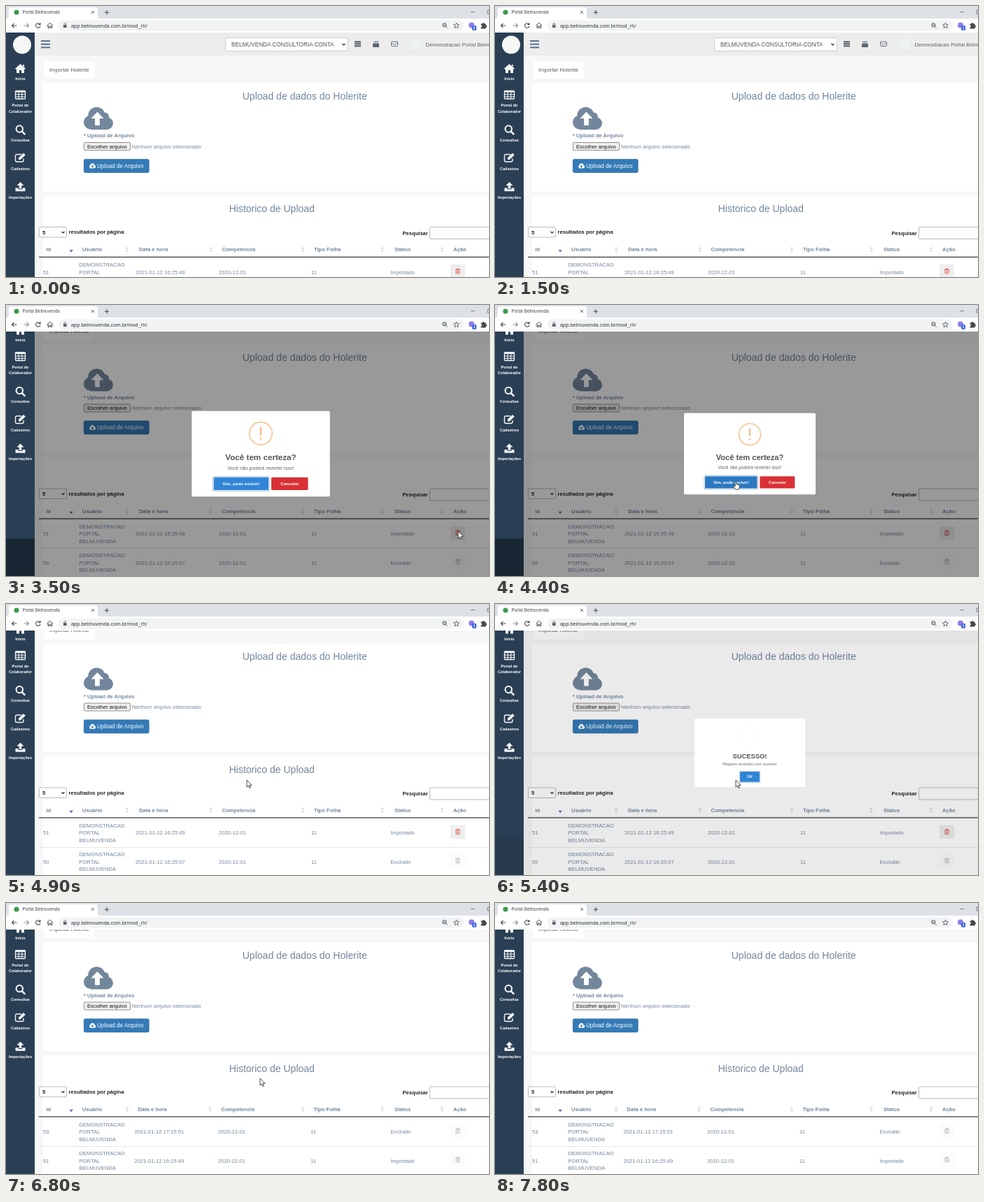
Animation of 690x388 px, one loop 7900 ms. Source, as an HTML page:

```html
<!DOCTYPE html>
<html lang="pt-BR">
<head>
<meta charset="utf-8">
<title>Portal Belmuvenda</title>
<style>
html, body { margin: 0; width: 100%; height: 100%; overflow: hidden; background: #fff; }
svg { display: block; width: 100vw; height: 100vh; }
text { font-family: "Liberation Sans", Arial, sans-serif; white-space: pre; }
</style>
</head>
<body>
<svg id="stage" viewBox="0 0 690 388"></svg>
<script>
const LOOP = 7900, SCROLL = 53.5;
const SLATE = '#73879c', NAVY = '#2a3f54', BLUE = '#3085d6';
const stage = document.getElementById('stage');

// Markup helpers; text is placed by the middle of its capitals.
const rect = (x, y, w, h, fill, more = '') =>
  `<rect x="${x}" y="${y}" width="${w}" height="${h}" fill="${fill}" ${more}/>`;
const circle = (x, y, r, fill, more = '') =>
  `<circle cx="${x}" cy="${y}" r="${r}" fill="${fill}" ${more}/>`;
const path = (d, fill, more = '') => `<path d="${d}" fill="${fill}" ${more}/>`;
const line = (d, color, w = 1, more = '') =>
  path(d, 'none', `stroke="${color}" stroke-width="${w}" ${more}`);
const text = (x, y, s, size, fill, more = '') =>
  `<text x="${x}" y="${y + size * 0.35}" font-size="${size}" fill="${fill}" ${more}>${s}</text>`;
const group = (id, body) => `<g id="${id}">${body}</g>`;
const BOLD = 'font-weight="700"', MID = 'text-anchor="middle"';
const chevron = (x, y) => line(`M${x - 2} ${y - 1}l2 2l2-2`, '#222', 1.1);

function browser() {
  const I = '#45494d';
  return rect(0, 0, 690, 18, '#dee1e6') +
    path('M1 18q3 0 3-3V5q0-3 3-3H128q3 0 3 3v10q0 3 3 3z', '#fff') +
    circle(15, 9, 3.6, '#3c9a4e') +
    text(23.5, 9, 'Portal Belmuvenda', 6.3, I) +
    line('M122 7l4 4m0-4l-4 4', '#5f6368', 0.9) +
    line('M144 6v6.4M140.8 9.2h6.4', I) +
    line('M664 8.5h6M690 6h-2v5h2', '#666', 0.8) +
    rect(0, 18, 690, 20, '#fff') +
    rect(75, 20.5, 579, 15, '#f1f3f4', 'rx="7.5"') +
    line('M15.5 28h-7m3-3l-3 3l3 3', I, 1.1) +
    line('M25.5 28h7m-3-3l3 3l-3 3', '#8d9195', 1.1) +
    line('M48.5 26a3.3 3.3 0 1 0 .5 3M49 24v2.6h-2.6', I, 1.1) +
    line('M58.5 28.2l4.3-4l4.3 4M60 27.5v4h1.8v-2.6h2v2.6h1.8v-4', I) +
    rect(82, 27, 4.6, 4, '#5f6368', 'rx=".6"') +
    line('M83 27.2v-1.4a1.3 1.3 0 0 1 2.6 0v1.4', '#5f6368', 0.8) +
    text(93, 28, 'app.belmuvenda.com.br/mod_rh/', 7.4, '#33373a') +
    circle(626.3, 27.2, 2.6, 'none', `stroke="${I}"`) +
    line('M628.3 29.2l2.3 2.3M625 27.2h2.6', I, 0.9) +
    line('M643.5 24l1.1 2.7l2.9.2l-2.2 1.9l.7 2.8l-2.5-1.5l-2.5 1.5l.7-2.8l-2.2-1.9l2.9-.2z', I, 0.8) +
    circle(665, 27.5, 4, '#8b7fe8') +
    rect(666, 28, 6, 6.8, '#3b62d9', 'rx="1.4"') +
    text(669, 31.5, '2', 5.4, '#fff', `id="badge" ${MID} ${BOLD}`) +
    path('M678.5 25.6h2a1.5 1.5 0 0 1 3 0h2v2a1.5 1.5 0 0 1 0 3v1.9h-7v-2a1.4 1.4 0 0 0 0-2.9z', I);
}

function sidebar() {
  const W = '#f3f6f8';
  const label = (y, s) => text(20.5, y, s, 5.55, '#fff', `${MID} ${BOLD}`);
  return rect(0, 38, 41, 520, NAVY) +
    circle(23, 55.5, 13, '#f4f7f4') +
    path('M20.5 83l7.5 6.6l-1 1.1l-1-.8v6h-4v-4h-3v4h-4v-6l-1 .8l-1-1.1zM24 84h2v3l-2-1.6z', W) +
    label(104, 'Início') +
    rect(13.5, 121.5, 14, 11.5, 'none', `stroke="${W}" stroke-width="1.3" rx="1"`) +
    rect(13.5, 121, 14, 2.6, W) +
    line('M18.2 122v11M22.8 122v11M13.5 126.6h14M13.5 129.9h14', W) +
    label(142.2, 'Portal do') + label(151, 'Colaborador') +
    circle(19.3, 176, 4.7, 'none', `stroke="${W}" stroke-width="2.1"`) +
    line('M22.8 179.6l3.8 3.8', W, 2.6, 'stroke-linecap="round"') +
    label(191.7, 'Consultas') +
    line('M22 212.5h-6.5q-2 0-2 2v6.5q0 2 2 2h7.5q2 0 2-2v-2.5', W, 1.4) +
    path('M18 217.2l7-6.8l2.8 2.8l-7 6.8h-2.8z', W) +
    label(233, 'Cadastros') +
    path('M20.5 252l5 5h-3.2v4.5h-3.6v-4.5h-3.2zM13.5 260.5h4v2h6v-2h4v4.8h-14z', W) +
    label(274, 'Importações');
}

function topbar() {
  const I = '#5b6570';
  return rect(41, 38, 649, 33, '#ededed') +
    [50, 54.6, 59.2].map(y => rect(50, y - 0.9, 13, 2.1, '#5a738e')).join('') +
    rect(313.5, 45.5, 175, 19, '#fff', 'stroke="#ccc" rx="1"') +
    text(322, 55, 'BELMUVENDA CONSULTORIA CONTA', 8.2, '#4d5359') + chevron(482.5, 55) +
    [50.2, 53.2, 56.2].map(y => rect(498, y, 9, 2.2, I)).join('') +
    path('M524 54h9v5h-9z', I) +
    line('M526 50v4M528.5 50v4M531 50v4', I, 1.1) +
    rect(550.5, 51, 9, 6.6, 'none', `stroke="${I}" stroke-width=".9" rx="1"`) +
    line('M550.5 52.5l4.5 3l4.5-3', I, 0.8) +
    circle(585.5, 55, 8, '#eef4ef') +
    text(599.5, 55, 'Demonstracao Portal Belmuvenda', 7.64, '#5a6168');
}

function upload() {
  const cloud = circle(121, 166.5, 10, SLATE) + circle(129.5, 157, 12.2, SLATE) +
    circle(141, 158.5, 6, SLATE) + circle(144, 168, 9, SLATE) + rect(121, 160, 23, 17, SLATE);
  return rect(54, 79, 73, 30, '#fff', 'stroke="#eee" stroke-width=".6"') +
    text(62, 91.3, 'Importar Holerite', 7.64, '#555e68') +
    rect(52, 104, 638, 5, '#f7f7f7') +
    rect(52, 109, 640, 157, '#fff', 'stroke="#f0f0f0" stroke-width=".6"') +
    text(337.7, 128.7, 'Upload de dados do Holerite', 14.05, SLATE) + cloud +
    path('M130.5 151.5l9 9.5h-5.6v10h-6.8v-10h-5.6z', '#fff') +
    text(111, 185.8, '* Upload de Arquivo', 7.6, SLATE, BOLD) +
    rect(111.5, 195.5, 66, 11, '#efefef', 'stroke="#767676" stroke-width=".8" rx="1.5"') +
    text(116, 201, 'Escolher arquivo', 7.64, '#111') +
    text(180, 201, 'Nenhum arquivo selecionado', 7.64, SLATE) +
    rect(111.4, 219.4, 92.8, 19, '#337ab7', 'stroke="#2e6da4" stroke-width=".8" rx="1.8"') +
    circle(121.5, 230, 2.4, '#fff') + circle(123.5, 228, 2.8, '#fff') +
    circle(126, 230, 2.2, '#fff') + rect(121, 229, 5, 3.4, '#fff') +
    path('M123.5 227.8l2 2.2h-1.3v1.8h-1.4v-1.8h-1.3z', '#337ab7') +
    text(130, 229, 'Upload de Arquivo', 8.15, '#fff');
}

function trash(y, live) {
  const c = live ? '#e0504c' : '#b4b7ba';
  return rect(635, y - 10, 21, 19.5, live ? '#eee' : '#fbfbfb', 'rx="1.5"') +
    line(`M642 ${y - 2.5}h7M644.2 ${y - 2.7}v-1.3h2.6v1.3`, c, 0.9) +
    line(`M642.9 ${y - 2}v5h5.2v-5M644.7 ${y - 1}v3M646.3 ${y - 1}v3`, c, 0.8);
}

function table(rows, dx) {
  const heads = [['id', 57.5], ['Usuário', 109], ['Data e hora', 190 + dx * 1.5],
    ['Competencia', 308.5 + dx], ['Tipo Folha', 440 + dx / 2], ['Status', 555], ['Ação', 639]];
  const sorts = [173, 292.5 + dx, 424, 537.5, 623];
  let out = heads.map(([s, x]) => text(x, 348.4, s, 7.6, SLATE, BOLD)).join('') +
    path('M90.5 349.2h5.4l-2.7 3.6z', '#5a6fb5') +
    sorts.map(x => path(`M${x - 2.4} 348h4.8l-2.4-3.4zM${x - 2.4} 349.5h4.8l-2.4 3.4z`, '#dadde0')).join('') +
    rect(47, 358.9, 643, 1.2, '#333');
  rows.forEach(([id, date, status, live], i) => {
    const y = 381.2 + i * 41.3;
    const cells = [[53, id], [185 + dx * 1.5, date], [304 + dx, '2020-12-01'], [436 + dx, '11'], [549.5, status]];
    out += cells.map(([x, s]) => text(x, y, s, 7.64, SLATE)).join('') +
      ['DEMONSTRACAO', 'PORTAL', 'BELMUVENDA'].map((s, k) => text(104.5, y + (k - 1) * 10.8, s, 7.64, SLATE)).join('') +
      rect(47, y + 20.3, 643, 0.7, '#ddd') + trash(y - 1.2, live);
  });
  return out;
}

function history() {
  return rect(52, 271, 640, 300, '#fff', 'stroke="#f0f0f0" stroke-width=".6"') +
    text(318.7, 290.1, 'Historico de Upload', 14, SLATE) +
    rect(47.5, 316.5, 39, 14.5, '#fff', 'stroke="#aaa" stroke-width=".8" rx="1"') +
    text(52, 324, '5', 7.64, '#222', BOLD) + chevron(81.5, 324) +
    text(89.5, 323.5, 'resultados por página', 7.58, '#222', BOLD) +
    text(566.5, 325, 'Pesquisar', 7.6, '#222', BOLD) +
    rect(605.5, 316.5, 95, 17, '#fff', 'stroke="#aaa" stroke-width=".8" rx="1"') +
    group('before', table([[51, '2021-01-12 16:25:49', 'Importado', 1], [50, '2021-01-12 16:25:07', 'Excluido', 0]], 0)) +
    group('after', table([[53, '2021-01-12 17:15:51', 'Excluido', 0], [51, '2021-01-12 16:25:49', 'Importado', 0]], -1));
}

function button(x, w, s, fill, id, focus) {
  const ring = focus ? rect(x - 1.6, 243.6, w + 3.2, 20.6, '#adc1d5', 'rx="2.5"') +
    rect(x - 0.6, 244.6, w + 1.2, 18.6, '#fff', 'rx="2"') : '';
  return ring + rect(x, 245.2, w, 17.4, fill, `rx="1.5" id="${id}"`) +
    text(x + w / 2, 254, s, 5.9, '#fff', `${MID} ${BOLD}`);
}

const modal = (id, title, note, body) => group(id,
  rect(270, 154.7, 188, 116.6, '#fff', 'rx="1.8"') +
  text(364, 218.1, title, 11.1, '#545454', `${MID} ${BOLD}`) +
  text(364, 232.2, note, 6.65, '#666', MID) + body);

const confirmBox = modal('confirm', 'Você tem certeza?', 'Você não poderá reverter isso!',
  circle(364, 185.2, 15.5, 'none', 'stroke="#f8c594" stroke-width="1.6"') +
  rect(363, 176.5, 2, 11.5, '#f6b47b', 'rx="1"') + circle(364, 192.5, 1.3, '#f6b47b') +
  button(300, 74.5, 'Sim, pode excluir!', BLUE, 'yes', true) +
  button(378.3, 50, 'Cancelar', '#d93035', 'no'));

const doneBox = modal('done', 'SUCESSO!', 'Registro excluído com sucesso',
  circle(364, 185, 15.5, 'none', 'id="ring" stroke="#a5dc86" stroke-width="1.8"') +
  line('M355.5 185.5l6 6l11.5-12', '#a5dc86', 2, 'id="check" pathLength="1" stroke-dasharray="1 2" stroke-linecap="round"') +
  button(347.4, 33.2, 'OK', BLUE, 'ok', true));

const arrow = path('M0 0v10.2l2.3-2.2l1.6 3.6l1.5-.7l-1.5-3.5h3.2z', '#fff',
  'id="arrow" stroke="#222" stroke-width=".8"');
const hand = path('M-.9 1q.9-1.2 1.8 0v3.5l4 1q.9.4.7 1.5l-.8 3.7q-.3 1-1 1.3h-4q-2-2-3.5-4.8q.9-1.2 2.8.6z', '#fff',
  'id="hand" stroke="#222" stroke-width=".8"');

stage.innerHTML = rect(0, 0, 690, 388, '#f7f7f7') +
  group('page', sidebar() + topbar() + upload() + history()) +
  rect(0, 334.5, 41, 53.5, NAVY, 'id="tail"') +
  path('M41 38H690V388H0V334.5H41z', '#000', 'id="shade"') +
  confirmBox + doneBox + browser() + group('cursor', arrow + hand);

const el = {};
stage.querySelectorAll('[id]').forEach(n => el[n.id] = n);
const set = (n, k, v) => el[n].setAttribute(k, v);
const show = (n, on) => el[n].style.display = on ? '' : 'none';

const clamp = x => Math.min(1, Math.max(0, x));
const smooth = x => (x = clamp(x), x * x * (3 - 2 * x));

// Interpolates a list of [time, ...values].
function track(keys, t) {
  const i = keys.findIndex(k => k[0] > t);
  if (i < 0) return keys[keys.length - 1].slice(1);
  if (i === 0) return keys[0].slice(1);
  const a = keys[i - 1], b = keys[i], p = smooth((t - a[0]) / (b[0] - a[0]));
  return a.slice(1).map((v, j) => v + (b[j + 1] - v) * p);
}

const POP = [[0, 0.7], [135, 1.05], [240, 0.95], [300, 1]];
const MOVES = [[1600, 518, 268], [2150, 646, 324], [3550, 646, 324], [4150, 344, 252],
  [5750, 344, 252], [6250, 363, 251], [6850, 363, 251], [7180, 120, 214]];
const HANDS = [[2100, 3365], [4100, 4800], [6200, 6700]];
const BOXES = { confirm: [3365, 4800], done: [5342, 6700] };
const within = (t, [a, b]) => t >= a && t < b;

function draw(t) {
  set('page', 'transform', `translate(0 ${-SCROLL * smooth((t - 1600) / 400)})`);
  el.badge.textContent = t < 1100 ? '2' : '1';
  show('before', t < 5700);
  show('after', t >= 5700);
  show('tail', t >= 2000);

  let shade = 0;
  for (const [id, [open, close]] of Object.entries(BOXES)) {
    const out = clamp((t - close) / 95);
    const s = track(POP, t - open)[0] * (1 - out / 2);
    show(id, t >= open && out < 1);
    set(id, 'transform', `translate(364 213) scale(${s}) translate(-364 -213)`);
    set(id, 'opacity', 1 - out);
    shade += 0.4 * clamp((t - open) / 100) ** 3 * (1 - out);
  }
  set('shade', 'opacity', shade);

  const age = t - BOXES.done[0], drawn = smooth((age - 150) / 400);
  set('ring', 'stroke-opacity', 0.3 * smooth(age / 250));
  show('check', drawn > 0);
  set('check', 'stroke-dashoffset', 1 - drawn);
  set('yes', 'fill', t >= 4100 ? '#2b78c1' : BLUE);
  set('ok', 'fill', t >= 6200 ? '#226bb3' : BLUE);

  const [x, y] = track(MOVES, t), hot = HANDS.some(h => within(t, h));
  show('cursor', within(t, [1600, 7200]));
  set('cursor', 'transform', `translate(${x} ${y})`);
  show('hand', hot);
  show('arrow', !hot);
}

const start = performance.now();
function tick() {
  draw((performance.now() - start) % LOOP);
  requestAnimationFrame(tick);
}
tick();
</script>
</body>
</html>
```
